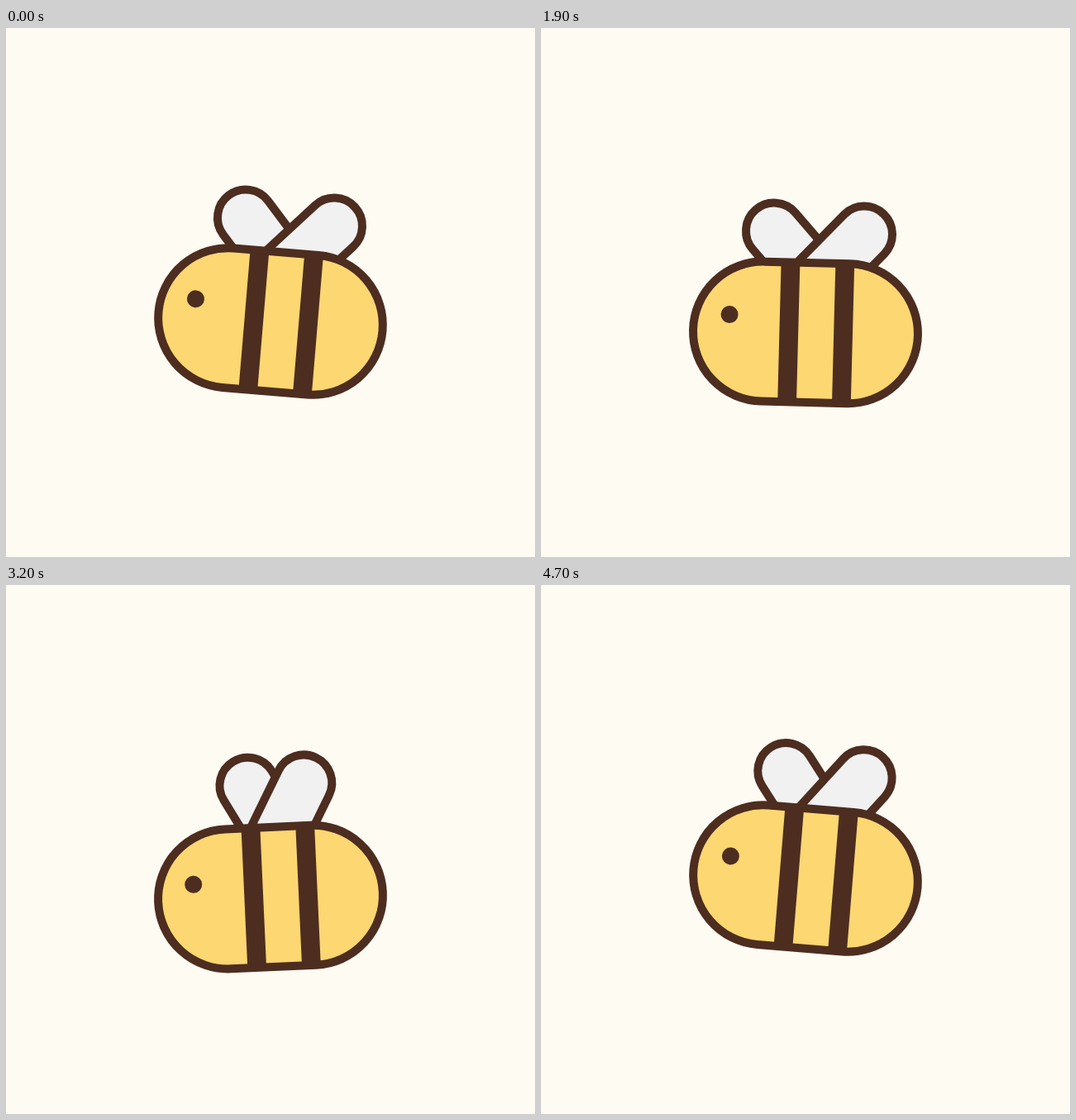
Write an HTML page with a canvas that moves like this. It is 640 px wide and 640 px high and loops after 4.8 s.

```html
<!DOCTYPE html>
<html lang="en">
<head>
<meta charset="utf-8">
<title>Bee</title>
<style>
html, body { margin: 0; width: 100%; height: 100%; overflow: hidden; background: #fefbf3; }
canvas { display: block; width: 100vmin; height: 100vmin; margin: 0 auto; }
</style>
</head>
<body>
<canvas id="stage" width="640" height="640"></canvas>
<script>
const ctx = document.getElementById('stage').getContext('2d');
const LOOP = 4800, STEP = 100, TAU = Math.PI * 2;
const INK = '#4d2d1f', HONEY = '#fdd771', WING = '#f1f1f2', PAPER = '#fefbf3';

const rad = deg => deg * Math.PI / 180;
const wave = (t, period, shift) => Math.cos(TAU * (t + shift) / period);

// Sine ease from 0 to 1 between two times
function ease(t, from, to) {
  const u = Math.min(1, Math.max(0, (t - from) / (to - from)));
  return (1 - Math.cos(Math.PI * u)) / 2;
}

// Two dips per loop, with a rest at the top and bottom of each
function bob(t) {
  const dip = ease(t, 100, 1000) - ease(t, 1450, 2380)
    + ease(t, 2500, 3400) - ease(t, 3750, 4600);
  return 355 + 25.6 * dip;
}

function wing(x, deg) {
  const r = 34, len = 105;
  ctx.save();
  ctx.translate(x, -44);
  ctx.rotate(rad(deg));
  ctx.beginPath();
  ctx.moveTo(-r, 0);
  ctx.lineTo(-r, -len);
  ctx.arc(0, -len, r, Math.PI, TAU);
  ctx.lineTo(r, 0);
  ctx.fillStyle = WING;
  ctx.fill();
  ctx.stroke();
  ctx.restore();
}

function body() {
  const r = 84.5, half = 51.5;
  const shape = new Path2D();
  shape.arc(-half, 0, r, Math.PI / 2, Math.PI * 1.5);
  shape.arc(half, 0, r, -Math.PI / 2, Math.PI / 2);
  shape.closePath();
  ctx.fillStyle = HONEY;
  ctx.fill(shape);
  ctx.fillStyle = INK;
  for (const x of [-20.2, 45.6]) ctx.fillRect(x - 11.4, -r, 22.8, 2 * r);
  ctx.stroke(shape);
  ctx.beginPath();
  ctx.arc(-92.5, -19.5, 10.5, 0, TAU);
  ctx.fill();
}

function draw(t) {
  ctx.fillStyle = PAPER;
  ctx.fillRect(0, 0, 640, 640);
  ctx.save();
  ctx.translate(320, bob(t));
  ctx.rotate(rad(4.8 * wave(t, 2400, 20)));
  ctx.strokeStyle = INK;
  ctx.lineWidth = 10;
  const flap = wave(t, 480, 25);
  wing(29.3, -31 - 11.2 * flap);
  wing(-3.8, 31 + 12.1 * flap);
  body();
  ctx.restore();
}

const start = performance.now();
function tick() {
  const t = (performance.now() - start) % LOOP;
  draw(Math.floor(t / STEP) * STEP);
  requestAnimationFrame(tick);
}
draw(0);
requestAnimationFrame(tick);
</script>
</body>
</html>
```
